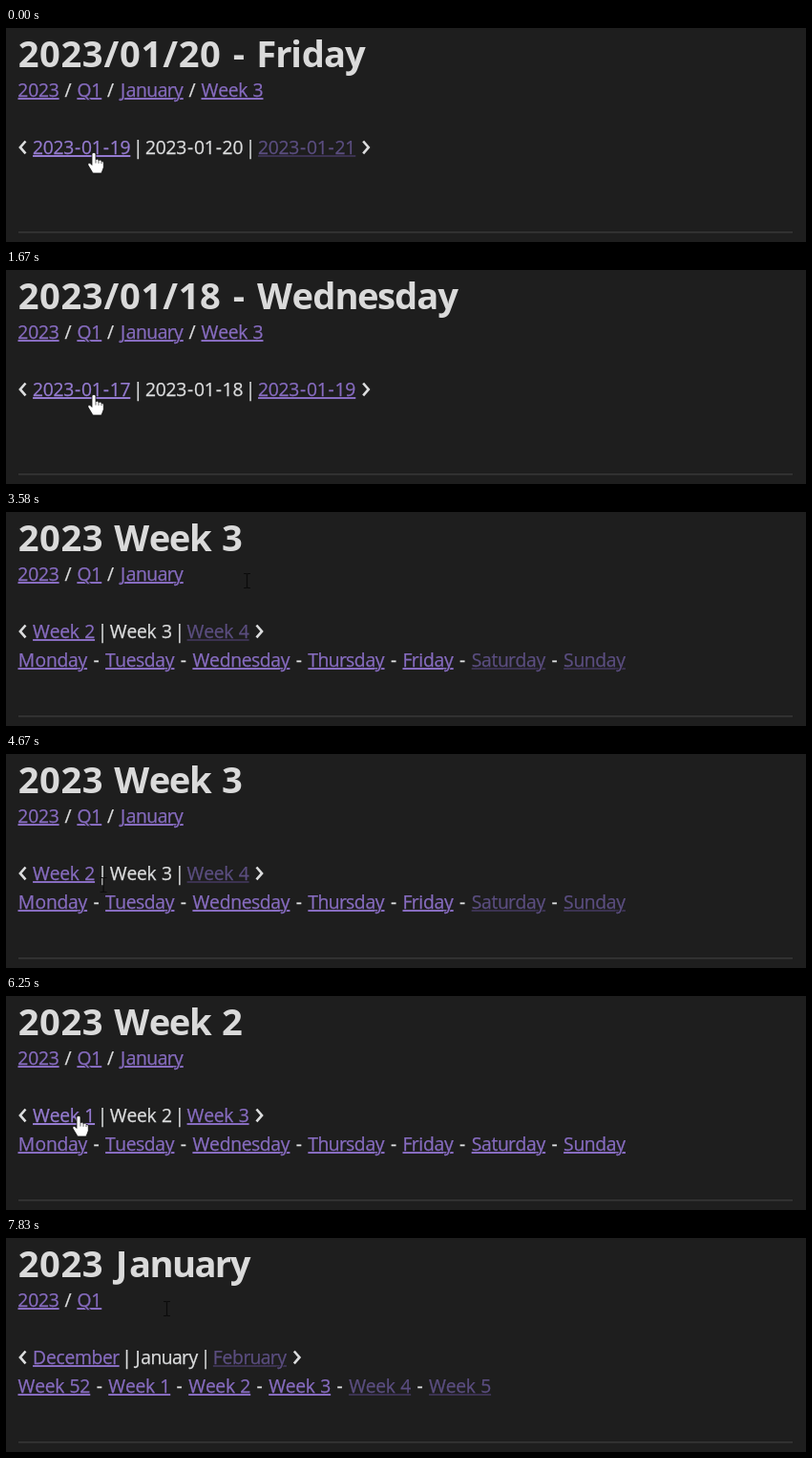
These frames come from a looping animation (838 by 224 pixels, 8 s). An HTML page:

```html
<!DOCTYPE html>
<html lang="en">
<head>
<meta charset="utf-8">
<title>Calendar notes</title>
<style>
  html, body { margin: 0; width: 100%; height: 100%; overflow: hidden; background: #1e1e1e; }
  svg { display: block; width: 838px; height: 224px; color: #dcddde; }
  text { font-family: "Open Sans", "Noto Sans", sans-serif; text-anchor: middle; fill: currentColor; }
  .body { font-size: 19.3px; fill: currentColor; stroke: currentColor; stroke-width: .25; }
  .title { font-size: 38.2px; font-weight: 700; color: #dadada; }
  .link { color: #876cc0; }
  .dim { color: #5b4e80; }
  .hover { color: #957bd0; }
  .gap { color: #1e1e1e; stroke-width: 2; }
  .line { fill: currentColor; }
  .line.dim { color: #3b3250; }
  .chevron { fill: none; stroke: currentColor; stroke-width: 2.6; }
  .hand { fill: #fff; stroke: #111; stroke-width: .8; }
  .crease { fill: none; stroke: #222; stroke-width: .7; }
  .beam { fill: none; stroke: #0b0b0b; stroke-width: 1.2; }
</style>
</head>
<body>
<svg id="stage" viewBox="0 0 838 224">
  <g id="page"></g>
  <rect x="13" y="213" width="811" height="1.6" fill="#363636"/>
  <g id="cursor"></g>
</svg>
<script>
const LOOP = 8000, STEP = 1000 / 12, LEFT = 12.5;
const pageEl = document.getElementById('page');
const cursorEl = document.getElementById('cursor');

// Glyph advances in thousandths of an em; 0 stands for every digit.
const advances = spec => Object.fromEntries(
  [...spec.matchAll(/(.)(\d{3})/g)].map(m => [m[1], m[2] / 1000]));
const REGULAR = { size: 20, adv: advances(
  ' 274-400/389|2390539D701F488J357M898Q756S531T524W894a509b588c462d589e523' +
  'h565i242k497m861n565o586r348s424t339u565y484‹505›505') };
const BOLD = { size: 38.8, adv: advances(
  ' 276-406/4370576F538J440T571W980a556d620e540h605i284k580n605r398s442u605y540') };

const DAYS = ['Monday', 'Tuesday', 'Wednesday', 'Thursday', 'Friday', 'Saturday', 'Sunday'];
const link = (text, exists = true) => exists ? `[${text}]` : `{${text}}`;
const nav = (prev, here, next) => `‹ ${prev} | ${here} | ${next} ›`;
const CRUMBS = ['[2023]', '[Q1]', '[January]', '[Week 3]'];
const crumbs = count => CRUMBS.slice(0, count).join(' / ');

function dayPage(d) {
  const date = n => '2023-01-' + n;
  return { title: `2023/01/${d} - ${DAYS[d - 16]}`, lines: [
    crumbs(4), nav(link(date(d - 1)), date(d), link(date(d + 1), d < 20))] };
}

function weekPage(w) {
  const week = n => 'Week ' + n;
  return { title: '2023 ' + week(w), lines: [
    crumbs(3), nav(link(week(w - 1)), week(w), link(week(w + 1), w < 3)),
    DAYS.map((name, i) => link(name, w < 3 || i < 5)).join(' - ')] };
}

const monthPage = { title: '2023 January', lines: [
  crumbs(2), nav('[December]', 'January', '{February}'),
  [52, 1, 2, 3, 4, 5].map(n => link('Week ' + n, n < 4 || n > 5)).join(' - ')] };

const BASELINES = [71.7, 131.7, 161.7];
const SCENES = [
  [0, dayPage(20)], [580, dayPage(19)], [1670, dayPage(18)], [2580, dayPage(19)],
  [3330, weekPage(3)], [5500, weekPage(2)], [7330, monthPage]
];

// Pointer path: time, x, y of the hot spot.
const PATH = [
  [0, 92, 130], [1670, 92, 130], [2170, 285, 125], [2580, 285, 125],
  [2830, 272.5, 98.5], [3170, 252.5, 72], [4420, 252.5, 72], [4670, 102, 137],
  [4840, 75, 146], [5170, 76, 125], [6250, 76, 125], [6830, 168.5, 74], [LOOP, 168.5, 74]
];

// Centres of the glyphs, and the x where the run ends.
function layout(text, x, face) {
  const centres = [...text].map(ch => {
    const w = face.adv[/\d/.test(ch) ? '0' : ch] * face.size;
    x += w;
    return (x - w / 2).toFixed(2);
  });
  return { centres: centres.join(' '), end: x };
}

const run = (text, centres, y, cls) =>
  `<text class="${cls}" x="${centres}" y="${y}" xml:space="preserve">${text}</text>`;

function chevron(x, y, dir) {
  const open = x + 5.2 + 2.8 * dir, tip = x + 5.2 - 2.8 * dir;
  return `<path class="chevron" d="M${open} ${y - 13.2}L${tip} ${y - 6.8}L${open} ${y - .4}"/>`;
}

function parseLine(line, y) {
  let x = LEFT;
  return [...line.matchAll(/\[(.+?)\]|\{(.+?)\}|([‹›])|([^[{‹›]+)/g)].map(m => {
    const text = m[1] || m[2] || m[3] || m[4];
    const kind = m[1] ? 'link' : m[2] ? 'dim' : m[3] ? 'chevron' : '';
    const part = { text, kind, x, y, ...layout(text, x, REGULAR) };
    x = part.end;
    return part;
  });
}

// The dark outline under a link's text breaks its underline at descenders.
function drawPart(p, hover) {
  if (p.kind === 'chevron') return chevron(p.x, p.y, p.text === '‹' ? 1 : -1);
  const tone = hover ? 'hover' : p.kind;
  const label = run(p.text, p.centres, p.y, 'body ' + tone);
  if (!p.kind) return label;
  return `<rect class="line ${tone}" x="${p.x}" y="${Math.round(p.y) + 1}" width="${p.end - p.x}" height="2"/>` +
    run(p.text, p.centres, p.y, 'body gap') + label;
}

for (const [, page] of SCENES) {
  page.parts = page.lines.flatMap((line, i) => parseLine(line, BASELINES[i]));
  page.heading = run(page.title, layout(page.title, LEFT, BOLD).centres, 41, 'title');
}

const HAND = `<path class="hand" d="M-2 1.8Q0-1.4 2 1.8V7.6Q4 6.4 5 8.4Q7 7.4 8 9.4
  Q10 9 10.3 11V16L8 22H-1L-6 13.6Q-6.4 10.4-4 11.4L-2 13.4Z"/>
  <path class="crease" d="M2 7.6V11.5M5 8.4V11.8M8 9.4V12"/>`;
const BEAM = '<path class="beam" d="M-3.5-7.5H-1L0-6.8L1-7.5H3.5M0-7V7M-3.5 7.5H-1L0 6.8L1 7.5H3.5"/>';

function pointerAt(t) {
  const i = PATH.findIndex(k => k[0] > t);
  const [t0, x0, y0] = PATH[i - 1], [t1, x1, y1] = PATH[i];
  const u = (t - t0) / (t1 - t0), e = u * u * (3 - 2 * u);
  return [x0 + (x1 - x0) * e, y0 + (y1 - y0) * e];
}

const hits = (p, x, y) => (p.kind === 'link' || p.kind === 'dim') &&
  x >= p.x && x <= p.end && y >= p.y - 21 && y <= p.y + 5;

let shown = -1;
function draw(time) {
  const step = Math.floor((time % LOOP + 4) / STEP) % 96;
  if (step === shown) return;
  shown = step;
  const t = step * STEP;
  const page = SCENES.filter(s => s[0] <= t + 5).pop()[1];
  const [x, y] = pointerAt(t);
  const over = page.parts.find(p => hits(p, x, y));
  pageEl.innerHTML = page.heading + page.parts.map(p => drawPart(p, p === over)).join('');
  cursorEl.innerHTML = over ? HAND : BEAM;
  cursorEl.setAttribute('transform', `translate(${x.toFixed(1)} ${y.toFixed(1)})`);
}

const start = performance.now();
function tick() {
  draw(performance.now() - start);
  requestAnimationFrame(tick);
}
tick();
</script>
</body>
</html>
```
